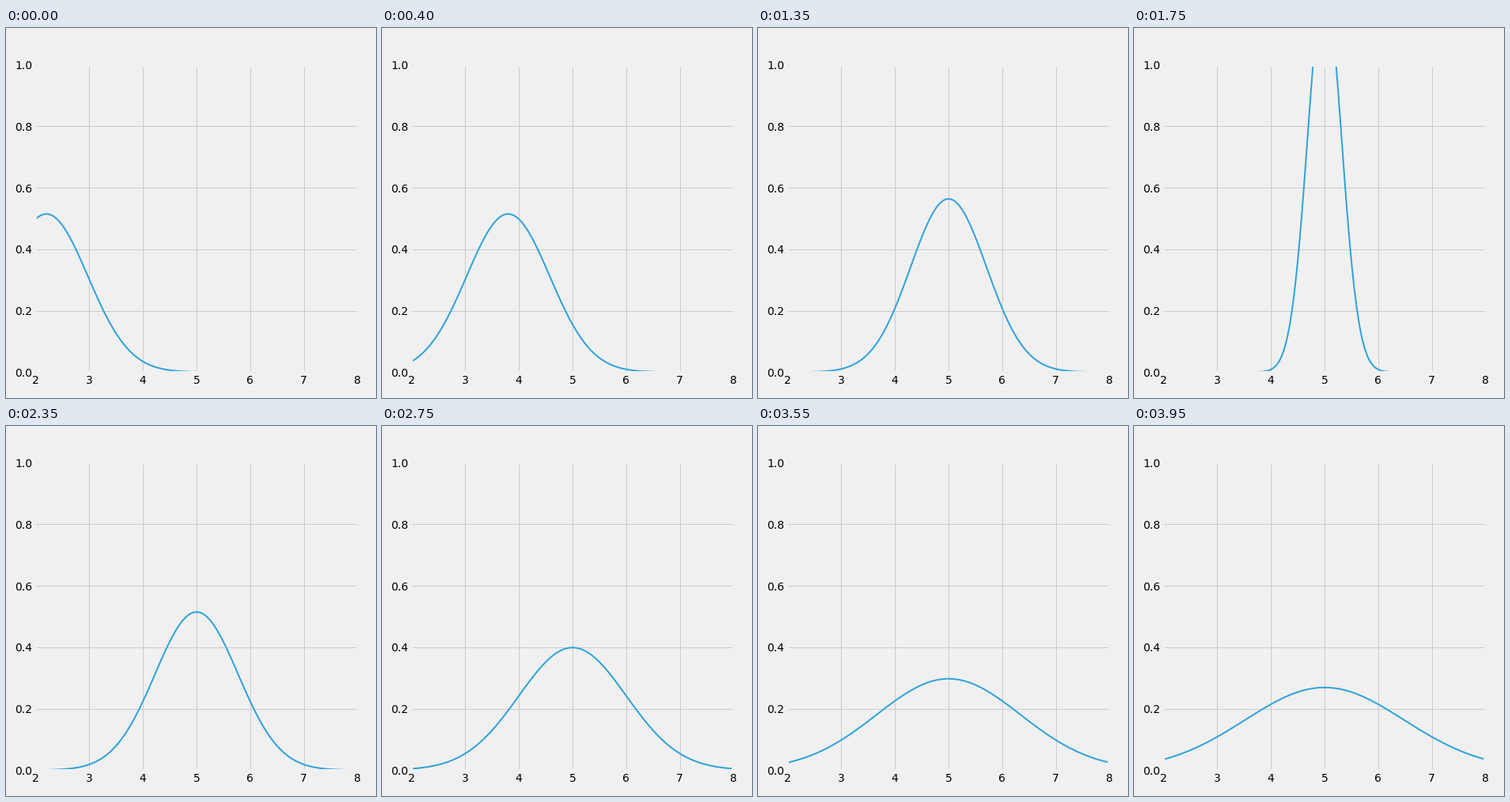
Recreate the animation shown at these times as a matplotlib script. Size 468 px wide and 468 px high, loop 4 s.

```python
import numpy as np
import matplotlib.pyplot as plt
from matplotlib.animation import FuncAnimation

SIZE, DPI = 468, 72
FRAMES, INTERVAL = 80, 50
SLIDE = 25      # frames spent sliding the mean to the right
NARROWEST = 36  # frame with the smallest variance
PAPER, GRID, BLUE = "#f0f0f0", "#cbcbcb", "#30a2da"

plt.rcParams["font.family"] = "DejaVu Sans"


def gaussian(x, mean, var):
    return np.exp(-(x - mean) ** 2 / (2 * var)) / np.sqrt(2 * np.pi * var)


def params(frame):
    """Mean and variance of the curve at a frame."""
    if frame < SLIDE:
        return 2.2 + 0.2 * frame, 0.6
    return 5.0, 0.05 * (1 + abs(frame - NARROWEST))


fig = plt.figure(figsize=(SIZE / DPI, SIZE / DPI), dpi=DPI, facecolor=PAPER)
ax = fig.add_axes([0.08, 0.07, 0.87, 0.83], facecolor=PAPER)
ax.set(xlim=(2, 8), ylim=(0, 1))
ax.set_xticks(range(2, 9))
ax.set_yticks(np.linspace(0, 1, 6))
ax.set_axisbelow(True)
ax.grid(color=GRID, linewidth=1, linestyle="-")
ax.tick_params(length=0, pad=4, labelsize=14, labelcolor="black")
for spine in ax.spines.values():
    spine.set(edgecolor=PAPER, linewidth=3)

xs = np.arange(120) * 0.05 + 2
curve, = ax.plot(xs, gaussian(xs, *params(0)), color=BLUE, linewidth=2)


def update(frame):
    curve.set_ydata(gaussian(xs, *params(frame)))
    return curve,


anim = FuncAnimation(fig, update, frames=FRAMES, interval=INTERVAL,
                     repeat=True, repeat_delay=0, blit=False)
plt.show()
```
